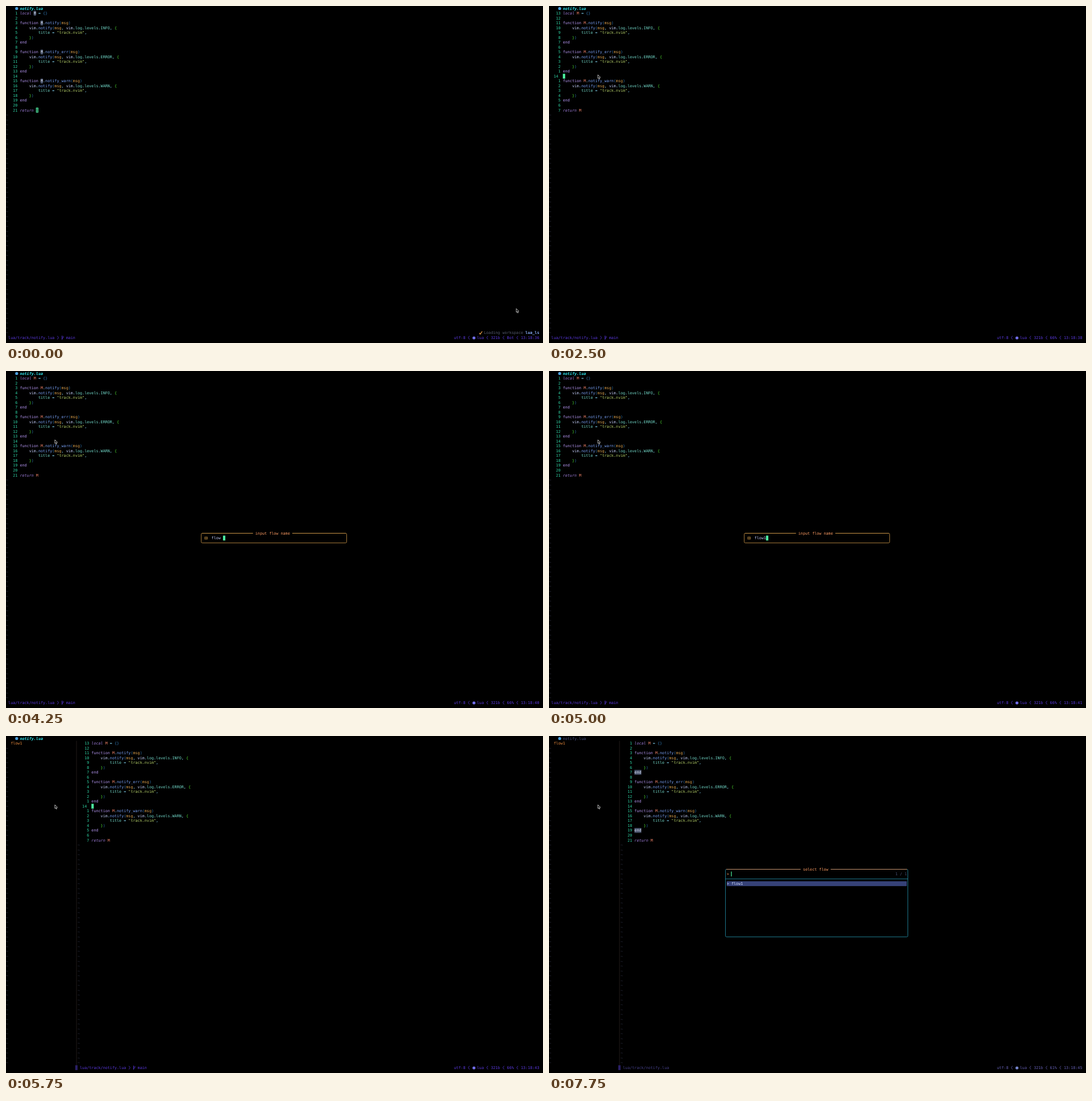
Write an HTML page with a canvas that moves like this. It is 945 px wide and 593 px high and loops after 8000 ms.

```html
<!DOCTYPE html>
<html lang="en">
<head>
<meta charset="utf-8">
<title>Editor flow demo</title>
<style>
  html, body { margin: 0; width: 100%; height: 100%; overflow: hidden; background: #000; }
  canvas { display: block; }
</style>
</head>
<body>
<canvas id="stage" width="945" height="593"></canvas>
<script>
const ctx = document.getElementById('stage').getContext('2d');
const CW = 4.0625, RH = 8.52, LOOP = 8000, STEP = 250;

const notifier = (suffix, level) => [
  `function M.notify${suffix}(msg)`,
  `    vim.notify(msg, vim.log.levels.${level}, {`,
  '        title = "track.nvim",',
  '    })',
  'end',
  ''
];
const code = ['local M = {}', '', ...notifier('', 'INFO'), ...notifier('_err', 'ERROR'),
  ...notifier('_warn', 'WARN'), 'return M'];

const C = {
  number: '#2fd6a6', cursor: '#4df5a2', status: '#5b39e0', tilde: '#34374c',
  orange: '#ff9e64', gold: '#d9a04c', teal: '#279db9', mark: '#465068', text: '#c0caf5'
};

// Value of the last [time, value] pair already reached.
const at = (t, steps) => steps.filter(s => s[0] <= t).pop()[1];

function rect(x, y, w, h, color) {
  ctx.fillStyle = color;
  ctx.fillRect(x, y, w, h);
}

const cell = (col, row, color, n = 1) => rect(col * CW, row * RH, n * CW, RH, color);

function text(col, row, str, color, style = '') {
  ctx.save();
  ctx.scale(0.1, 0.1);
  ctx.font = `${style} 67.5px "DejaVu Sans Mono", monospace`;
  ctx.textRendering = 'geometricPrecision';
  ctx.fillStyle = color;
  [...str].forEach((ch, i) => {
    if (ch !== ' ') ctx.fillText(ch, (col + i) * CW * 10, (row * RH + 6.6) * 10);
  });
  ctx.restore();
}

function line(points, color, width = 0.8) {
  ctx.beginPath();
  points.forEach(([x, y]) => ctx.lineTo(x, y));
  ctx.strokeStyle = color;
  ctx.lineWidth = width;
  ctx.stroke();
}

function dot(x, y, color) {
  ctx.beginPath();
  ctx.arc(x, y, 2.6, 0, 7);
  ctx.fillStyle = color;
  ctx.fill();
}

function chevron(col, dir, color) {
  const x = (col + 0.5) * CW, y = 68.5 * RH;
  line([[x - dir, y - 3], [x + dir, y], [x - dir, y + 3]], color);
}

function tokenColor(word, depth) {
  if (word[0] === '"') return '#b4cf68';
  if (/^(local|return)$/.test(word)) return '#9d7cd8';
  if (/^(function|end)$/.test(word)) return '#b294ee';
  if (/^notify/.test(word)) return '#7aa2f7';
  if (/[(){}]/.test(word)) return depth > 1 ? '#4fdc32' : '#2f78b4';
  if (/[=.,]/.test(word)) return '#89ddff';
  return { M: '#f7866a', msg: '#e0a550', vim: C.text }[word] || '#73daca';
}

function drawCode(t, left, current, relative) {
  const matched = t >= 7000 && t < 7750;
  let depth = 0;
  code.forEach((src, i) => {
    const n = i + 1;
    if (relative && n === current) text(left + 2, n, String(n), C.number);
    else text(left + 3, n, String(relative ? Math.abs(n - current) : n).padStart(2), C.number);

    let col = left + 6;
    for (const word of src.match(/"[^"]*"|\w+|\s+|./g) || []) {
      if (/[({]/.test(word)) depth++;
      let color = tokenColor(word, depth);
      let style = /^(local|return)$/.test(word) ? 'italic' : '';
      if (/[)}]/.test(word)) depth--;
      const marked = word === 'M' && t < 1000 ||
        word === 'end' && t >= 7250 && (n === 7 || n === 19);
      if (marked) {
        cell(col, n, C.mark, word.length);
        color = '#dde4f8';
      }
      if (matched && (n === 9 && word === 'function' || n === 13)) {
        color = '#ff8f5c';
        style = 'bold';
      }
      text(col, n, word, color, style);
      col += word.length;
    }
  });
}

function drawCursor(t, left, current) {
  if (t < 750) {
    cell(left + 13, 21, C.cursor);
    rect((left + 13) * CW + 1, 21 * RH + 1, CW - 2, RH - 2, '#22583f');
    text(left + 13, 21, 'M', '#3cbf80');
  } else {
    cell(left + 6, current, C.cursor);
    if (current === 13) text(left + 6, current, 'e', '#123');
  }
}

function drawStatus(t, left) {
  const dim = t >= 7750;
  const color = dim ? '#655fb4' : C.status;
  const y = 68.5 * RH;
  text(left + 1, 68, 'lua/track/notify.lua', dim ? '#46418a' : color);
  if (!dim) {
    chevron(left + 22, 1, color);
    const x = (left + 24.3) * CW;
    line([[x, y - 3.5], [x, y + 3.5]], color, 1);
    line([[x, y + 1.5], [x + 2.3, y - 0.3], [x + 2.3, y - 2.5]], color);
    text(left + 26, 68, 'main', color);
  }
  text(194, 68, 'utf-8', color);
  [200, 208, 215, 221].forEach(col => chevron(col, -1, color));
  dot(823.5, y + 0.4, dim ? '#7585cc' : '#716ee8');
  text(204, 68, 'lua', color);
  text(210, 68, '321b', color);
  text(217, 68, at(t, [[0, 'Bot'], [750, '66%'], [7000, '61%']]), color);
  const sec = at(t, [[0, 36], [500, 37], [2500, 38], [2750, 40], [4500, 41],
    [5250, 42], [5750, 43], [6750, 44], [7750, 45]]);
  text(223, 68, '13:18:' + sec, color);
}

// Centre of a cell, moved to the middle of its pixel so that 1px lines stay sharp.
const mid = (index, size) => Math.floor((index + 0.5) * size) + 0.5;

function frame(c1, r1, c2, r2, title, titleCol, topColor, color) {
  const [x1, x2] = [c1, c2].map(c => mid(c, CW));
  const [y1, y2] = [r1, r2].map(r => mid(r, RH));
  rect(x1, y1, x2 - x1, y2 - y1, '#000');
  ctx.beginPath();
  ctx.roundRect(x1, y1, x2 - x1, y2 - y1, 2);
  ctx.strokeStyle = color;
  ctx.lineWidth = 0.75;
  ctx.stroke();
  line([[x1 + 1.5, y1], [x2 - 1.5, y1]], topColor, 0.75);
  cell(titleCol - 1, r1, '#000', title.length + 2);
  text(titleCol, r1, title, C.orange);
}

function drawInput(t) {
  frame(84, 33, 147, 35, 'input flow name', 108, C.gold, C.gold);
  ctx.strokeStyle = C.gold;
  ctx.lineWidth = 0.6;
  ctx.strokeRect(349.8, 292, 4.8, 4);
  line([[350, 294], [354.6, 294]], C.gold, 0.5);
  line([[352.2, 292], [352.2, 296]], C.gold, 0.5);
  const typed = at(t, [[0, 'fl'], [3250, 'flo'], [4000, 'flow'], [4250, 'flow '],
    [4750, 'flow'], [5000, 'flow1']]);
  text(89, 34, typed, C.text);
  cell(89 + typed.length, 34, C.cursor);
}

function drawPicker() {
  frame(76, 27, 155, 41, 'select flow', 110, C.orange, C.teal);
  line([[mid(76, CW), mid(29, RH)], [mid(155, CW), mid(29, RH)]], C.teal, 0.75);
  text(77, 28, '>', C.orange);
  rect(79 * CW - 0.6, 28 * RH, 1.2, RH, C.cursor);
  text(150, 28, '1 / 1', '#4a5278');
  cell(77, 30, '#364278', 78);
  text(77, 30, '> flow1', '#d4dcfa');
}

function drawPointer(t) {
  const [x, y] = at(t, [[0, [898, 532.5]], [250, [130, 150]], [500, [90, 122.5]], [750, [86, 121]]]);
  ctx.beginPath();
  [[0, 0], [0, 6.4], [1.5, 5.3], [2.4, 7.6], [3.5, 7.1], [2.7, 4.9], [4.4, 4.6]]
    .forEach(([dx, dy]) => ctx.lineTo(x + dx, y + dy));
  ctx.closePath();
  ctx.fillStyle = '#000';
  ctx.fill();
  ctx.strokeStyle = '#e4e4e4';
  ctx.lineWidth = 0.8;
  ctx.stroke();
}

function draw(t) {
  const sidebar = t >= 5750, input = t >= 2750 && t < 5250, picker = t >= 7750;
  const left = sidebar ? 31 : 0;
  const current = t < 7000 ? 14 : 13;
  const relative = t >= 750 && !input && !picker;

  rect(0, 0, 945, 593, '#000');
  dot(18.8, 4.4, '#4b9fdc');
  text(6, 0, 'notify.lua', picker ? '#4a5282' : '#2ee8f0', picker ? '' : 'italic bold');

  for (let row = sidebar ? 2 : 22; row < 68; row++) text(0, row, '~', C.tilde);
  if (sidebar) {
    for (let row = 22; row < 68; row++) text(31, row, '~', C.tilde);
    text(2, 1, 'flow1', '#e88a3c');
    rect(123.6, RH, 0.9, 67 * RH, '#241f1c');
    cell(30, 68, '#2a1f66');
  }
  drawCode(t, left, current, relative);
  if (!input && !picker) drawCursor(t, left, current);

  if (t < 1250) {
    line([[833, 575.5], [834.5, 577.5], [838, 572.5]], '#eda24a', 1.3);
    text(207, 67, 'Loading workspace', '#565c70');
    text(225, 67, 'lua_ls', '#8aaefa', 'bold');
  }
  drawStatus(t, left);
  if (input) drawInput(t);
  if (picker) drawPicker();
  drawPointer(t);
}

function tick() {
  draw(Math.floor(performance.now() % LOOP / STEP) * STEP);
  requestAnimationFrame(tick);
}
tick();
</script>
</body>
</html>
```
